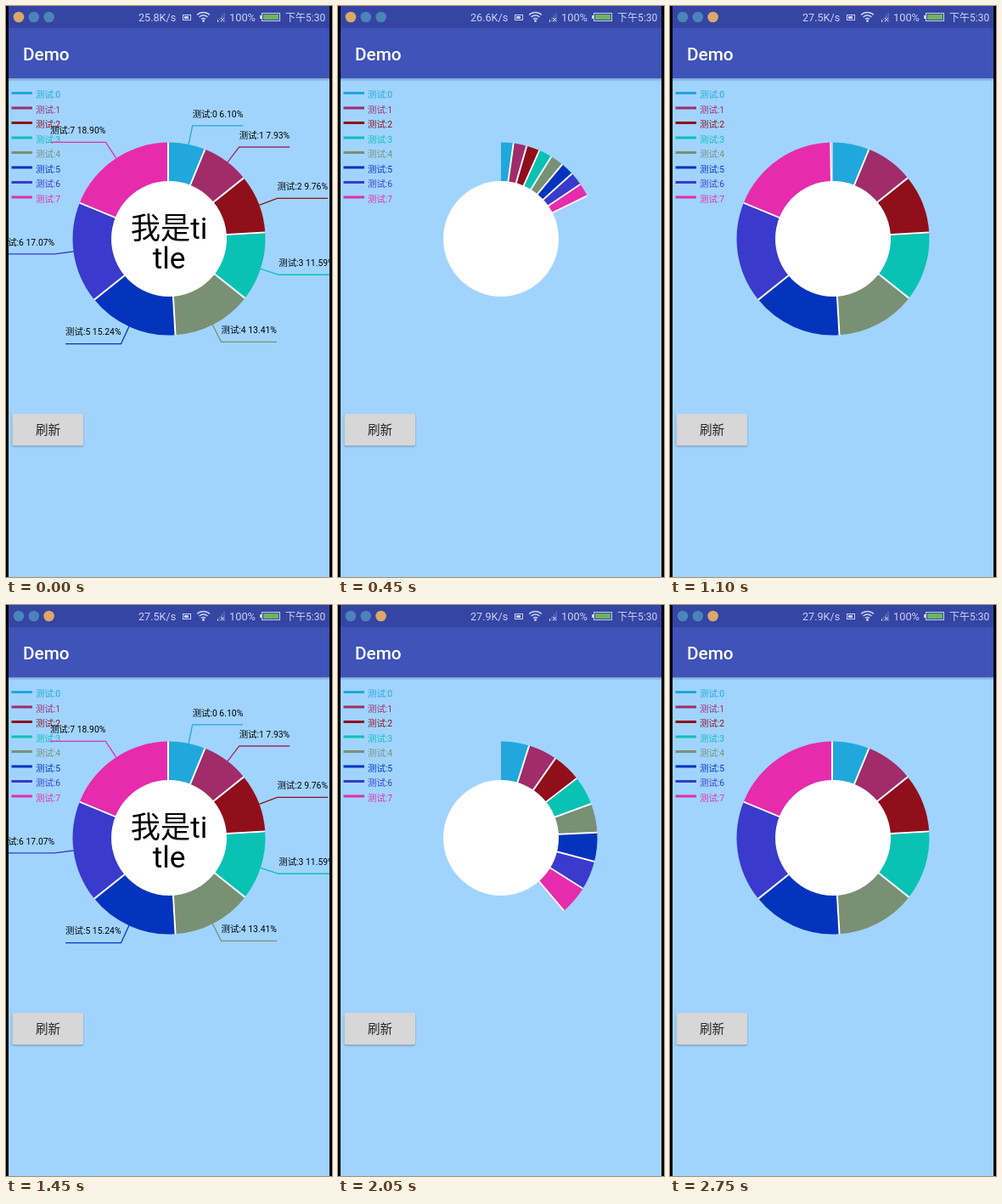
Write an HTML page with a canvas that moves like this. It is 384 px wide and 672 px high and loops after 2800 ms.

```html
<!DOCTYPE html>
<html lang="zh">
<head>
<meta charset="utf-8">
<title>Demo</title>
<style>
  html, body { margin: 0; width: 100%; height: 100%; overflow: hidden; background: #000; }
  canvas { display: block; }
</style>
</head>
<body>
<canvas id="stage" width="384" height="672"></canvas>
<script>
const ctx = document.getElementById('stage').getContext('2d');
const FONT = 'Roboto, "Noto Sans CJK SC", "Noto Sans CJK", sans-serif';
const LOOP = 2800, STEP = 50, TAU = Math.PI * 2, RAD = Math.PI / 180;
const CX = 192, CY = 274, OUTER = 113.5, INNER = 68, ELBOW = 136, GAP = 1;
const COLORS = ['#20a8dc', '#a02c6a', '#900f1a', '#0ac2b4', '#7a9074', '#0434be', '#3a3acc', '#e62cac'];
const STARTS = [259, 1749], DURATION = 908, LABEL_DELAY = 110;
const SPEEDS = [[0, '25.8'], [250, '26.6'], [700, '27.5'], [1600, '27.6'], [2050, '27.9']];

const values = COLORS.map((_, i) => 5 + 1.5 * i);
const total = values.reduce((a, b) => a + b);
const sweeps = values.map(v => v / total * (360 - GAP * values.length));

function text(str, x, y, size, color, align = 'left', weight = 400) {
  ctx.font = `${weight} ${size}px ${FONT}`;
  ctx.fillStyle = color;
  ctx.textAlign = align;
  ctx.fillText(str, x, y);
}

function rect(x, y, w, h, color) {
  ctx.fillStyle = color;
  ctx.fillRect(x, y, w, h);
}

function disc(x, y, r, color) {
  ctx.fillStyle = color;
  ctx.beginPath();
  ctx.arc(x, y, r, 0, TAU);
  ctx.fill();
}

function line(points, color, width) {
  ctx.strokeStyle = color;
  ctx.lineWidth = width;
  ctx.beginPath();
  points.forEach(p => ctx.lineTo(...p));
  ctx.stroke();
}

function polar(degrees, r) {
  return [CX + r * Math.sin(degrees * RAD), CY - r * Math.cos(degrees * RAD)];
}

function statusBar(t) {
  const ink = '#ccd2f0';
  rect(0, 0, 384, 26, '#3545a4');
  const active = t < 700 ? 0 : 2;
  for (let i = 0; i < 3; i++) disc(15 + 17.8 * i, 13, 6.3, i === active ? '#dca868' : '#4a84b8');

  const speed = SPEEDS.filter(s => s[0] <= t).pop()[1];
  text(speed + 'K/s', 156, 18, 12.6, ink);
  text('100%', 263, 18, 12.8, ink);
  text('下午5:30', 329, 18, 12, ink);

  rect(208, 10, 10, 7, ink);
  rect(209, 11, 8, 5, '#3545a4');
  rect(210, 12, 5, 3, ink);

  ctx.strokeStyle = ink;
  ctx.lineWidth = 1.3;
  for (const r of [3.5, 7, 10.5]) {
    ctx.beginPath();
    ctx.arc(232.5, 18, r, -Math.PI * 0.75, -Math.PI * 0.25);
    ctx.stroke();
  }
  disc(232.5, 17.5, 1.4, ink);

  for (let i = 0; i < 4; i++) rect(249 + 2.5 * i, 16 - 2.7 * i, 1, 3 + 2.7 * i, i < 1 ? ink : '#7580c4');
  line([[253, 14], [257, 18]], ink, 1);
  line([[257, 14], [253, 18]], ink, 1);

  ctx.strokeStyle = ink;
  ctx.lineWidth = 1;
  ctx.strokeRect(301.5, 8.5, 21, 9);
  rect(299, 11, 2, 4, ink);
  rect(303, 10, 18, 6, '#6cb45c');
}

function toolbar() {
  rect(0, 26, 384, 59, '#3f53b8');
  const shade = ctx.createLinearGradient(0, 85, 0, 89);
  shade.addColorStop(0, 'rgba(30,50,100,.32)');
  shade.addColorStop(1, 'rgba(30,50,100,0)');
  rect(0, 85, 384, 4, shade);
  text('Demo', 20, 64, 20.8, '#fff', 'left', 500);
}

function legend() {
  COLORS.forEach((color, i) => {
    const y = 102.5 + 17.5 * i;
    rect(6.5, y - 1.5, 24.5, 3, color);
    text('测试:' + i, 35, y + 5.5, 10.4, color);
  });
}

function button(pressed) {
  ctx.save();
  ctx.shadowColor = 'rgba(0,0,0,.35)';
  ctx.shadowBlur = 2;
  ctx.shadowOffsetY = 1;
  ctx.fillStyle = pressed ? '#cfd1d0' : '#d8d7d8';
  ctx.beginPath();
  ctx.roundRect(7.5, 480, 83.5, 37.5, 2);
  ctx.fill();
  ctx.restore();
  text('刷新', 49.5, 504.3, 14.6, '#222', 'center');
}

// Every slice opens at the same rate until it reaches its own size.
function donut(limit) {
  let angle = 0;
  sweeps.forEach((full, i) => {
    const end = angle + Math.min(full, limit) + GAP;
    ctx.fillStyle = COLORS[i];
    ctx.beginPath();
    ctx.moveTo(CX, CY);
    ctx.arc(CX, CY, OUTER, (angle - 90) * RAD, (end - 90) * RAD);
    ctx.fill();
    ctx.save();
    ctx.translate(CX, CY);
    ctx.rotate(end * RAD);
    rect(-2, -OUTER, 2, OUTER, '#fff');
    ctx.restore();
    angle = end;
  });
  disc(CX, CY, INNER, '#fff');
}

function labels() {
  let angle = 0;
  sweeps.forEach((sweep, i) => {
    const middle = angle + sweep / 2 + GAP;
    const [x, y] = polar(middle, ELBOW);
    const right = middle < 180;
    const label = `测试:${i} ${(values[i] / total * 100).toFixed(2)}%`;
    text(label, x, y - 10.3, 10.4, '#000', right ? 'left' : 'right');
    const width = ctx.measureText(label).width;
    line([polar(middle, OUTER), [x, y], [x + (right ? width : -width), y]], COLORS[i], 1.3);
    angle += sweep + GAP;
  });
  text('我是ti', CX, 273.5, 35.2, '#000', 'center');
  text('tle', CX, 309, 35.2, '#000', 'center');
}

function draw(t) {
  const start = STARTS.filter(s => s <= t).pop() ?? -Infinity;
  const elapsed = t - start;
  const progress = Math.min(elapsed / DURATION, 1);
  const eased = (1 - Math.cos(progress * Math.PI)) / 2;

  rect(0, 0, 384, 672, '#a0d4ff');
  statusBar(t);
  toolbar();
  legend();
  button(elapsed < 180);
  donut(eased * Math.max(...sweeps));
  if (elapsed > DURATION + LABEL_DELAY) labels();
  rect(0, 0, 3, 672, '#000');
  rect(381, 0, 3, 672, '#000');
}

const begin = performance.now();
function tick() {
  const t = (performance.now() - begin) % LOOP;
  draw(Math.floor(t / STEP) * STEP);
  requestAnimationFrame(tick);
}
tick();
</script>
</body>
</html>
```
